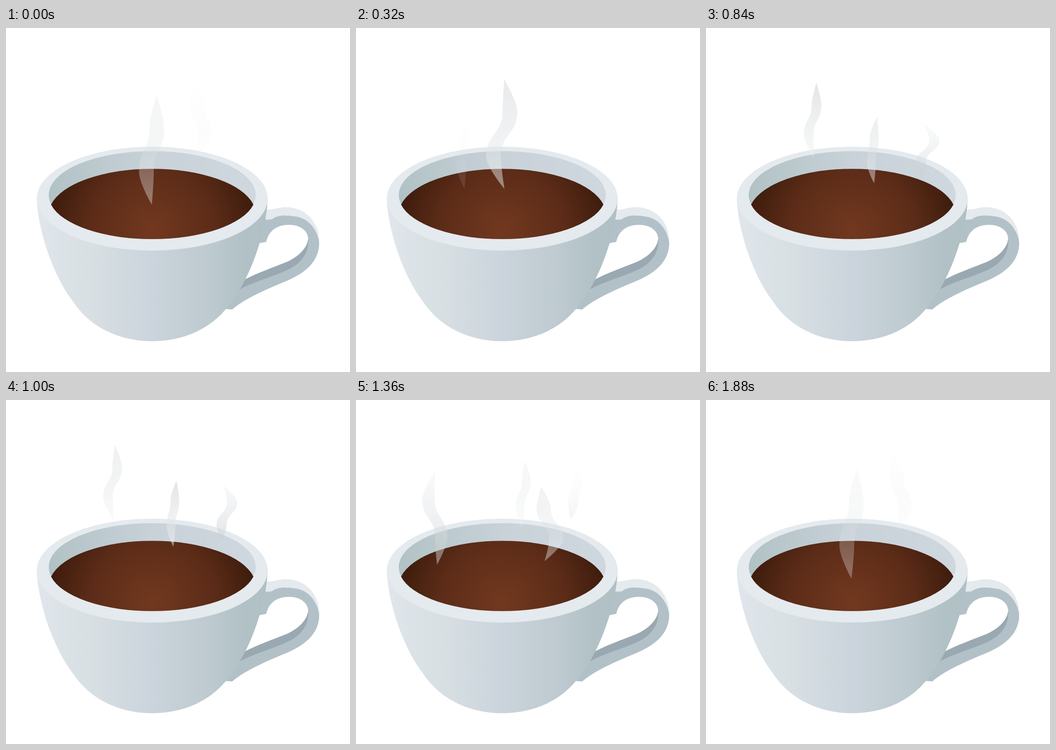
Recreate the animation shown at these times as an HTML page. Size 748 by 748 pixels, loop 1920 ms.

```html
<!DOCTYPE html>
<html lang="en">
<head>
<meta charset="utf-8">
<title>Steaming cup</title>
<style>
html, body { margin: 0; width: 100%; height: 100%; overflow: hidden; background: #fff; }
svg { display: block; width: 100%; height: 100%; }
</style>
</head>
<body>
<svg id="stage" viewBox="0 0 748 748">
  <defs>
    <linearGradient id="body">
      <stop offset="0" stop-color="#e0e6eb"/>
      <stop offset=".25" stop-color="#d7dfe3"/>
      <stop offset=".5" stop-color="#cbd4dc"/>
      <stop offset=".75" stop-color="#bdcacf"/>
      <stop offset=".9" stop-color="#b1c1c6"/>
      <stop offset="1" stop-color="#b0c0c5"/>
    </linearGradient>
    <linearGradient id="inside">
      <stop offset="0" stop-color="#b1c2c5"/>
      <stop offset=".5" stop-color="#c8d2d8"/>
      <stop offset="1" stop-color="#cfd7df"/>
    </linearGradient>
    <radialGradient id="coffee" gradientUnits="userSpaceOnUse" cx="318" cy="440" r="232">
      <stop offset="0" stop-color="#72381f"/>
      <stop offset=".58" stop-color="#5c2c18"/>
      <stop offset="1" stop-color="#3c1b0c"/>
    </radialGradient>
    <linearGradient id="steam" x2="0" y2="1">
      <stop offset=".1" stop-color="#cacfd2"/>
      <stop offset=".9" stop-color="#eef1f2"/>
    </linearGradient>
  </defs>
  <!-- handle -->
  <path fill="#b2c1c7" d="M540 400L566 395C580 397 590 390 611 390C655 392 681 425 681 467C681 505 655 531 610 550C560 571 520 588 492 612L478 611Z"/>
  <path fill="#e4eaed" d="M560 395H566C580 397 590 390 611 390C655 392 681 425 681 466C676 435 655 413 630 410C605 406 590 407 578 416C572 417 567 417 560 416Z"/>
  <path fill="#fff" d="M545 469L566 465C570 445 585 428 615 428C640 428 657 441 657 459C655 478 637 497 610 509C575 523 548 532 515 549Z"/>
  <path fill="#9aa9b1" d="M657 459C655 478 637 497 610 509C575 523 548 532 515 549L505 570C540 551 580 541 610 527C642 513 660 488 657 459Z"/>
  <!-- bowl, rim and coffee -->
  <path fill="url(#body)" d="M67 366C67 430 100 535 143 591C185 656 253 681 318 681C383 681 451 656 493 591C536 535 569 430 569 366Z"/>
  <ellipse fill="#e4eaee" cx="318" cy="371" rx="251" ry="113"/>
  <ellipse fill="url(#inside)" cx="318" cy="363" rx="225" ry="95.3"/>
  <path fill="url(#coffee)" d="M98 384A225 98.5 0 0 1 538 384A225 95 0 0 1 98 384Z"/>
</svg>
<script>
const LOOP = 1920, STEP = 40;
const stage = document.getElementById('stage');

// Each wisp rises from base height y at a steady speed (px per ms).
// Its spine, x at 0, 30, 70 and 100% of the height, bends from one shape to another.
const wisps = [
  { start: 1690, end: 2580, y: 409, speed: .108, height: 238, width: 32,
    from: [331, 323, 310, 313], to: [317, 342, 292, 329] },
  { start: 240, end: 1340, y: 359, speed: .13, height: 162, width: 21,
    from: [251, 235, 230, 236], to: [231, 245, 218, 232] },
  { start: 440, end: 1640, y: 385, speed: .118, height: 144, width: 19,
    from: [376, 362, 362, 370], to: [365, 373, 355, 357] },
  { start: 460, end: 1500, y: 378, speed: .131, height: 121, width: 22, darkBase: true,
    from: [470, 508, 463, 474], to: [476, 477, 474, 465] },
  { start: 1040, end: 1800, y: 388, speed: .093, height: 202, width: 27, darkBase: true,
    from: [168, 166, 179, 180], to: [177, 146, 194, 171] },
  { start: 1100, end: 2000, y: 384, speed: .13, height: 162, width: 31,
    from: [400, 405, 437, 407], to: [410, 416, 432, 418] },
];

function add(parent, tag, attrs) {
  const el = document.createElementNS('http://www.w3.org/2000/svg', tag);
  for (const k in attrs) el.setAttribute(k, attrs[k]);
  return parent.appendChild(el);
}

wisps.forEach((w, i) => {
  const grad = document.getElementById('steam').cloneNode(true);
  grad.id = 'steam' + i;
  stage.append(grad);
  w.stops = [...grad.children];
  if (w.darkBase) {
    const [a, b] = w.stops.map(s => s.getAttribute('stop-color'));
    w.stops[0].setAttribute('stop-color', b);
    w.stops[1].setAttribute('stop-color', a);
  }
  w.path = add(stage, 'path', { fill: `url(#${grad.id})` });
});

function draw(w, now) {
  const t = now < w.start ? now + LOOP : now;
  const k = Math.min(1, (t - w.start) / (w.end - w.start));
  const glow = Math.sin(Math.PI * k);
  // The top appears later and fades sooner than the base
  w.stops[0].setAttribute('stop-opacity', .5 * glow ** 3);
  w.stops[1].setAttribute('stop-opacity', .5 * glow);

  const [tip, upper, lower, base] = w.from.map((x, i) => x + (w.to[i] - x) * k);
  const bottom = w.y - w.speed * (t - w.start);
  const y = part => bottom - w.height * (1 - part);
  const half = w.width / 2;
  const u = upper + half, l = lower + half, u2 = upper - half, l2 = lower - half;
  w.path.setAttribute('d', `M${tip} ${y(0)}
    C${tip} ${y(0)} ${u} ${y(.2)} ${u} ${y(.3)}
    C${u} ${y(.5)} ${l} ${y(.5)} ${l} ${y(.7)}
    C${l} ${y(.8)} ${base} ${y(1)} ${base} ${y(1)}
    C${base} ${y(1)} ${l2} ${y(.8)} ${l2} ${y(.7)}
    C${l2} ${y(.5)} ${u2} ${y(.5)} ${u2} ${y(.3)}
    C${u2} ${y(.2)} ${tip} ${y(0)} ${tip} ${y(0)}Z`);
}

function frame() {
  const now = Math.floor(performance.now() % LOOP / STEP) * STEP;
  wisps.forEach(w => draw(w, now));
  requestAnimationFrame(frame);
}
frame();
</script>
</body>
</html>
```
